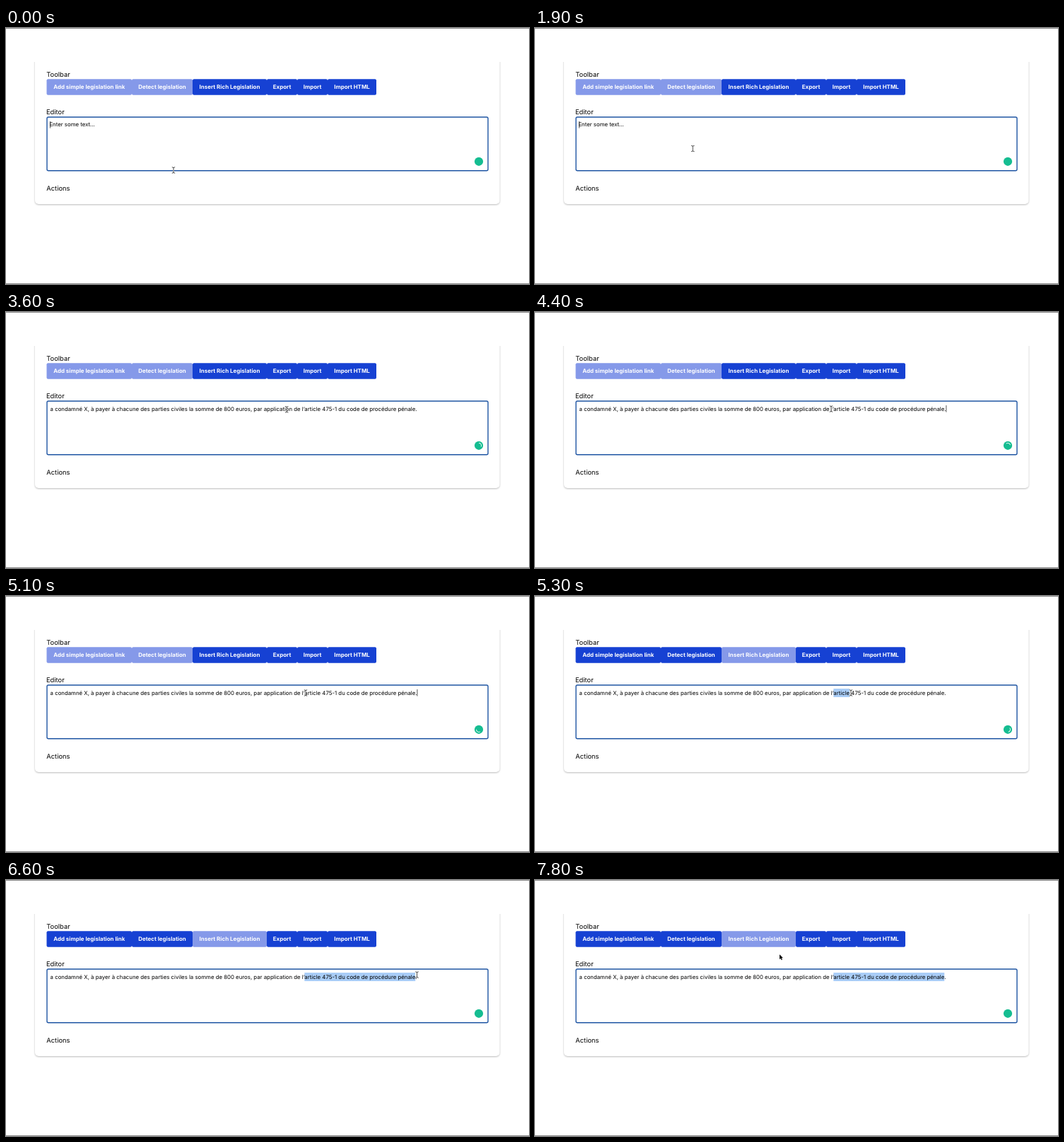
An HTML page that plays this animation: 740x362 px, repeating every 8000 ms.

```html
<!DOCTYPE html>
<html lang="en">
<head>
<meta charset="utf-8">
<title>Legislation editor</title>
<style>
  html, body { margin: 0; width: 100%; height: 100%; overflow: hidden; background: #fff; }
  svg { display: block; }
  text { font: 7.82px Inter, sans-serif; text-rendering: geometricPrecision; white-space: pre; }
  .label { font-size: 9.36px; }
  .button text { font-size: 7.95px; font-weight: 700; fill: #fff; }
  .button rect { fill: #1641d3; }
  .button.off rect { fill: #8599e9; }
  .card { fill: #fff; filter: drop-shadow(0 1px 1.3px #0004); }
</style>
</head>
<body>
<svg width="740" height="362" viewBox="0 0 740 362">
  <clipPath id="below"><path d="M0 48h740v314H0z"/></clipPath>
  <path d="M0 .5h740M0 361.5h740" stroke="#8c8c8c"/>
  <g clip-path="url(#below)"><rect class="card" x="41" y="30" width="657.5" height="219" rx="5"/></g>
  <text class="label" x="57.3" y="68.7">Toolbar</text>
  <text class="label" x="57" y="122">Editor</text>
  <text class="label" x="57.3" y="229.7">Actions</text>
  <g id="toolbar"></g>
  <rect x="58" y="126" width="624" height="75.7" rx="2" fill="#fff" stroke="#1f55a3" stroke-width="1.4"/>
  <rect id="selection" x="424" y="131" height="12" fill="#a9cdf7"/>
  <text id="placeholder" x="61.4" y="138.5">Enter some text...</text>
  <text id="content" x="62.6" y="139.7">a condamné X, à payer à chacune des parties civiles la somme de 800 euros, par application de l’article 475-1 du code de procédure pénale.</text>
  <path id="caret" stroke="#111" stroke-width=".7"/>
  <circle cx="669" cy="188.8" r="6.1" fill="#15bd91"/>
  <path id="spinner" d="M1.8 -3.1A3.6 3.6 0 0 1 1.8 3.1" fill="none" stroke="#fff" stroke-opacity=".85" stroke-width="1"/>
  <g id="beam" fill="none" stroke-linecap="round">
    <path d="M-1.8 -4.2Q0 -4.2 0 -3Q0 -4.2 1.8 -4.2M0 -3V3M-1.8 4.2Q0 4.2 0 3Q0 4.2 1.8 4.2" stroke="#fff" stroke-width="1.6"/>
    <path d="M-1.8 -4.2Q0 -4.2 0 -3Q0 -4.2 1.8 -4.2M0 -3V3M-1.8 4.2Q0 4.2 0 3Q0 4.2 1.8 4.2" stroke="#222" stroke-width=".8"/>
  </g>
  <path id="arrow" d="M0 0V7L1.6 5.5L2.7 8.1L3.9 7.6L2.8 5.1H5Z" stroke="#fff" stroke-width=".9" paint-order="stroke"/>
</svg>
<script>
const LOOP = 8000, STEP = 100;
const PASTE = 2100, SELECT = 5150, RELEASE = 6600;
const $ = id => document.getElementById(id);
const show = (id, on) => $(id).setAttribute('visibility', on ? 'visible' : 'hidden');
const place = (id, x, y, turn = 0) =>
  $(id).setAttribute('transform', `translate(${x} ${y}) rotate(${turn})`);

// Label, left edge, right edge, needs a text selection (1), must have none (-1)
const buttons = [
  ['Add simple legislation link', 57.5, 178, 1],
  ['Detect legislation', 178, 264, 1],
  ['Insert Rich Legislation', 264, 369, -1],
  ['Export', 369, 412, 0],
  ['Import', 412, 455, 0],
  ['Import HTML', 455, 524, 0],
];
$('toolbar').innerHTML = buttons.map(([label, left, right]) => `<g class="button">
  <rect x="${left}" y="72.2" width="${right - left}" height="22.6" rx="2"/>
  <text x="${(left + right) / 2}" y="85.8" text-anchor="middle">${label}</text></g>`).join('');

// Pointer path: time, x, y
const path = [
  [0, 237, 201], [100, 234.5, 196], [200, 231, 185.5], [300, 231, 185.5], [500, 223.3, 170.5],
  [2900, 223.3, 170.5], [3200, 362, 141], [3700, 406, 137], [4100, 407, 137], [4200, 419, 137],
  [4500, 419, 137], [4900, 424, 137], [5100, 424, 137], [5300, 447, 137], [5900, 540, 136],
  [6400, 581.5, 134], [7200, 581.5, 134], [7400, 540, 130], [7600, 400, 115], [7800, 346, 105.2],
];
function pointer(t) {
  const next = path.findIndex(p => p[0] > t);
  if (next < 0) return path.at(-1).slice(1);
  const [t0, x0, y0] = path[next - 1], [t1, x1, y1] = path[next];
  const k = (t - t0) / (t1 - t0);
  return [x0 + (x1 - x0) * k, y0 + (y1 - y0) * k];
}

const content = $('content');
const first = content.textContent.indexOf('article');
const last = content.textContent.length - 2;

// The selection snaps to letters and trails the pointer slightly
function drawSelection(t) {
  const x = pointer(Math.min(t, RELEASE) - 30)[0];
  const start = content.getStartPositionOfChar(first).x;
  let end = start;
  for (let i = first; i <= last; i++) {
    const a = content.getStartPositionOfChar(i).x, b = content.getEndPositionOfChar(i).x;
    if ((a + b) / 2 < x) end = b;
  }
  $('selection').setAttribute('x', start);
  $('selection').setAttribute('width', end - start);
}

function draw(t) {
  const pasted = t >= PASTE, selecting = t >= SELECT;
  show('placeholder', !pasted);
  show('content', pasted);
  show('selection', selecting);
  if (selecting) drawSelection(t);

  [...$('toolbar').children].forEach((button, i) =>
    button.classList.toggle('off', buttons[i][3] === (selecting ? -1 : 1)));

  const blink = (pasted ? t - PASTE : t + 100) % 1000;
  const caretX = pasted ? content.getEndPositionOfChar(last + 1).x + .4 : 62.5;
  $('caret').setAttribute('d', `M${caretX} 132v9.6`);
  show('caret', !selecting && blink < 500);

  show('spinner', t >= 2400 && t < 6500);
  place('spinner', 669, 188.8, 10 + (t - 2800) * 1.3);

  const [x, y] = pointer(t), inEditor = y > 126;
  show('beam', inEditor);
  show('arrow', !inEditor);
  place('beam', x, y);
  place('arrow', x, y);
}

function tick() {
  const t = performance.now() % LOOP;
  draw(Math.floor(t / STEP) * STEP);
  requestAnimationFrame(tick);
}
tick();
</script>
</body>
</html>
```
